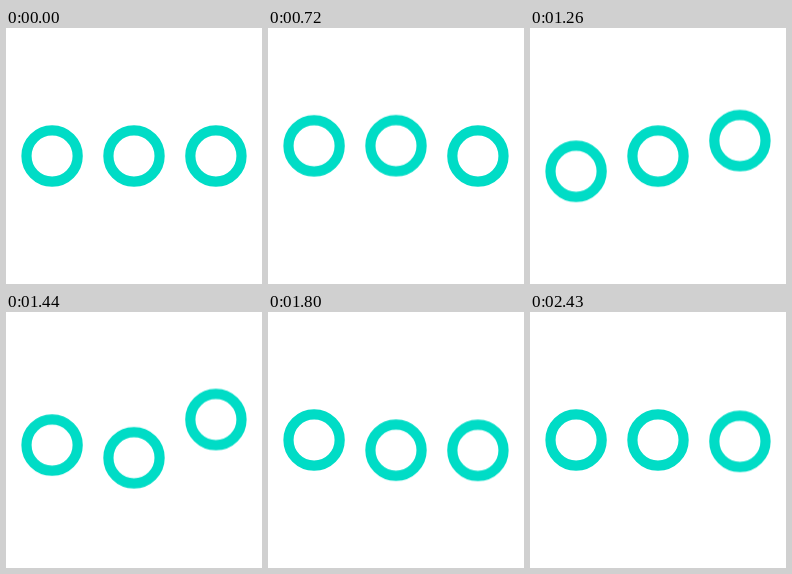
Write an HTML page that moves like this. It is 256 by 256 pixels and loops after 2.52 s.

```html
<!DOCTYPE html>
<html lang="en">
<head>
<meta charset="utf-8">
<title>Loading dots</title>
<style>
  html, body {
    margin: 0;
    width: 100%;
    height: 100%;
    overflow: hidden;
    background: #fff;
  }
  svg {
    display: block;
    width: 100%;
    height: 100%;
  }
  circle {
    fill: none;
    stroke: #00dcc6;
    stroke-width: 10.24px;
    animation: wave 2520ms cubic-bezier(.364, 0, .636, 1) infinite;
  }
  circle:nth-child(2) { animation-delay: 450ms; }
  circle:nth-child(3) { animation-delay: 900ms; }

  /* Three moves of 540 ms, then rest */
  @keyframes wave {
    0%       { transform: translateY(0); }
    21.4286% { transform: translateY(-20.48px); }
    42.8571% { transform: translateY(20.48px); }
    64.2857%, 100% { transform: translateY(0); }
  }
</style>
</head>
<body>
<svg viewBox="0 0 256 256">
  <circle cx="46.08" cy="128" r="25.6"/>
  <circle cx="128" cy="128" r="25.6"/>
  <circle cx="209.92" cy="128" r="25.6"/>
</svg>
</body>
</html>
```
